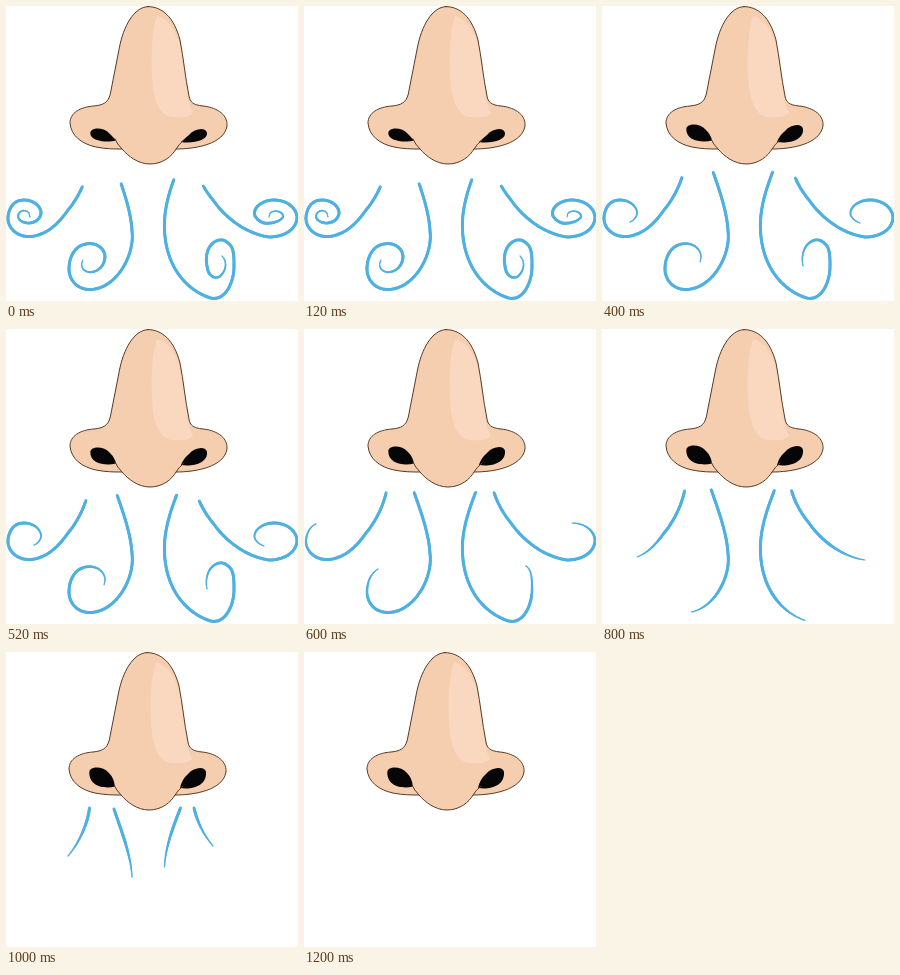
An HTML page with a canvas that plays this animation: 292 by 295 pixels, repeating every 1.4 s.

```html
<!DOCTYPE html>
<html lang="en">
<head>
<meta charset="utf-8">
<title>Breathing nose</title>
<style>
html, body { margin: 0; width: 100%; height: 100%; overflow: hidden; background: #fff; }
canvas { display: block; width: 100%; height: 100%; }
</style>
</head>
<body>
<canvas id="stage" width="292" height="295"></canvas>
<script>
const ctx = document.getElementById('stage').getContext('2d');
const STEP = 200, STEPS = 7;

const nose = new Path2D(`M142 .6C128 1 117.5 20 113.3 42L104.3 88C102 97 97 99 88 100
  C74 101 64 107 64 117C65 130 76 138 90 141C100 143 108 143 116 143
  C122 150 132 158 144 158C157 158 166 150 170 143C190 143 218 138 221 120
  C222 107 208 101 197 100C187 99 184 96 183 90C179 70 177.5 52 174 34C168 11 156 .6 142 .6Z`);
const creases = new Path2D('M109 133Q111 138 116 143M170 143Q173 138 178 134');
const shine = new Path2D(`M151 10C146 25 145 48 146 68C147 92 152 108 165 111
  C176 112 185 111 187 106C182 98 181 88 179 62C175 32 166 14 151 10Z`);

// Each swirl is built from pieces: the air reaches one piece further per step.
const swirls = [
  {
    pieces: ['M83.5 156C82 170 74 190 62 204', 'C55 214 46 224 35 228',
      'C16 236 1 224 2 211C3 202 7 197 12 195', 'C25 191 36 200 35 208C34 212 31 215 28 216',
      'C20 219 12 215 12 210', 'C13 204 20 203 23 207L24 211'],
    skip: [26, 22, 16, 8, 6, 0]
  },
  {
    pieces: ['M108 157C113.5 174 125 202 126 225', 'C129 248 112 279 89 283',
      'C73 286 63 275 63 263C63 253 67 244 74 240', 'C86 234 98 240 99 250Q99 253 98 256',
      'C95 265 84 269 78 264', 'C75 261 75 257 77 254'],
    skip: [22, 17, 10, 7, 4, 0]
  },
  {
    pieces: ['M174.5 156C167.5 174 159.5 194 158.5 215', 'C157 252 174 281 203 291.5',
      'C219 297 228 276 228 261C228 250 228 241 222 237', 'C215 230 206 236 203 242Q199 250 201 260',
      'C202 269 207 273 213 271', 'C220 266 222 256 216 250'],
    skip: [19, 15, 11, 8, 6, 0]
  },
  {
    pieces: ['M188 156C191 169 197 182 207 194', 'C221 214 242 228 263 231',
      'C280 231 291 222 291 211C290 201 280 194 268 194', 'C255 194 246 203 249 210Q252 215 258 217',
      'C264 218 274 216 277 211', 'C278 206 269 203 264 207L263 211'],
    skip: [26, 22, 17, 8, 6, 0]
  }
];

for (const s of swirls) {
  s.path = document.createElementNS('http://www.w3.org/2000/svg', 'path');
  s.ends = s.pieces.map((_, i) => {
    s.path.setAttribute('d', s.pieces.slice(0, i + 1).join(''));
    return s.path.getTotalLength();
  }).reverse();
}

function drawSwirl({ path, ends, skip }, step) {
  const end = ends[step];
  let last = path.getPointAtLength(skip[step]);
  for (let d = skip[step] + 2; d < end + 2; d += 2) {
    const at = Math.min(d, end), p = path.getPointAtLength(at);
    ctx.lineWidth = Math.min(3, 1.2 + (end - at) * 0.05);
    ctx.beginPath();
    ctx.moveTo(last.x, last.y);
    ctx.lineTo(p.x, p.y);
    ctx.stroke();
    last = p;
  }
}

function drawNostrils(top) {
  ctx.fillStyle = '#060606';
  const low = top + 7;
  ctx.fill(new Path2D(`M84.3 ${low - 2}C85 ${top - 1} 98 ${top - 1} 104 ${low - 1}
    Q109 ${low + 4} 110 134.5C100 137 84 135 84.3 ${low - 2}Z`));
  ctx.fill(new Path2D(`M201 ${low - 2}C200 ${top - 1} 189 ${top} 183 ${low}
    Q177 ${low + 5} 175 136C187 138 202 134 201 ${low - 2}Z`));
}

function draw(step) {
  ctx.clearRect(0, 0, 292, 295);
  ctx.lineCap = 'round';
  ctx.strokeStyle = '#4fb0e2';
  if (step < 6) swirls.forEach(s => drawSwirl(s, step));

  ctx.save();
  if (step > 4) ctx.translate(-1, 0);
  ctx.fillStyle = '#f5cdaf';
  ctx.fill(nose);
  ctx.fillStyle = '#fad8c0';
  ctx.fill(shine);
  drawNostrils([122, 120, 118, 117, 116, 115, 115][step]);
  ctx.strokeStyle = '#573a26';
  ctx.lineWidth = 1;
  ctx.stroke(nose);
  ctx.stroke(creases);
  ctx.restore();
}

function tick(now) {
  draw(Math.floor(now / STEP) % STEPS);
  requestAnimationFrame(tick);
}
tick(performance.now());
</script>
</body>
</html>
```
